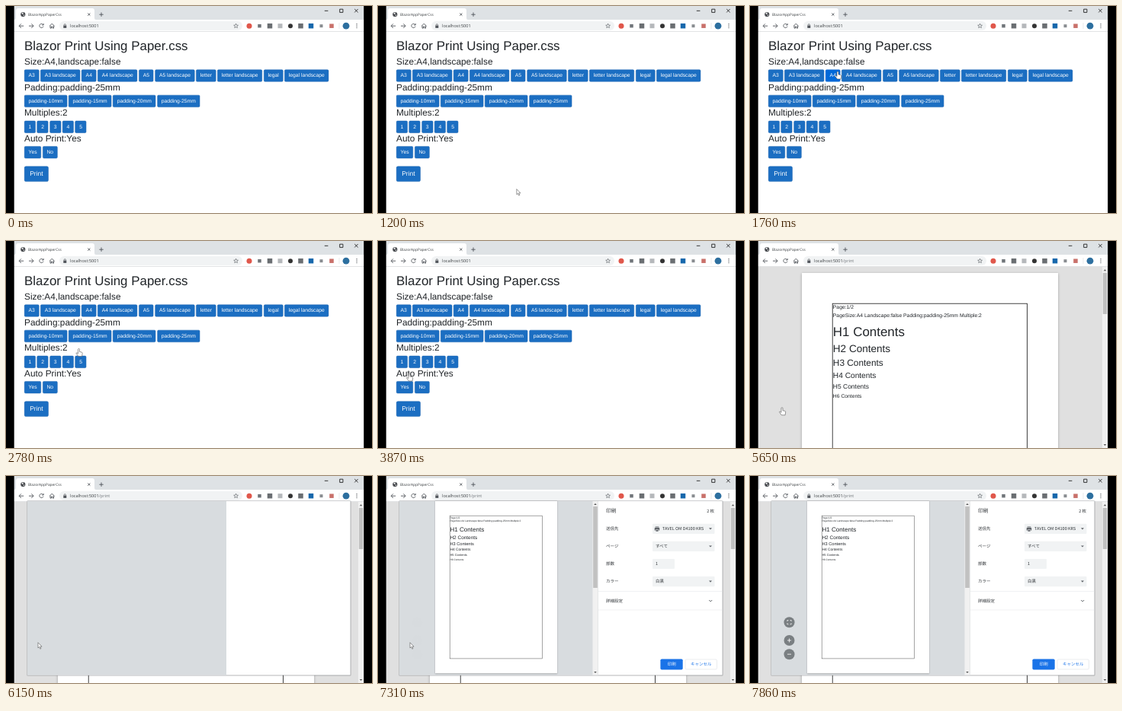
Recreate the animation shown at these times as an HTML page. Size 480x272 px, loop 8000 ms.

```html
<!DOCTYPE html>
<html lang="ja">
<head>
<meta charset="utf-8">
<title>Print demo</title>
<style>
html, body { margin: 0; width: 100%; height: 100%; overflow: hidden; background: #000; }
#stage { position: relative; width: 480px; height: 272px; overflow: hidden; background: #fff; text-rendering: geometricPrecision; }
#stage > * { position: absolute; }
svg { left: 0; top: 0; }
#form, .sheet { transform-origin: 0 0; font: 16px/1.5 "Liberation Sans", Arial, sans-serif; color: #212529; }
#form { left: 24px; top: 42px; width: 1040px; transform: scale(.4233); }
h1, h2, h3, h4, h5, h6 { margin: 0 0 8px; font-weight: 400; line-height: 1.2; }
h1 { font-size: 40px; } h2 { font-size: 32px; } h3 { font-size: 28px; }
h4 { font-size: 24px; } h5 { font-size: 20px; } h6 { font-size: 16px; }
p { margin: 0 0 16px; }
.row { height: 38px; white-space: nowrap; }
.btn { display: inline-block; vertical-align: top; padding: 6px 12px; border: 1px solid #1861ac; border-radius: 4px; background: #1b6ec2; color: #fff; }
.btn.lg { margin-top: 24px; padding: 8px 16px; font-size: 20px; border-radius: 5px; }
.btn.hover { background: #0069d9; border-color: #0062cc; }
.btn.down { background: #005cbf; }
#print { left: 0; top: 34px; width: 480px; height: 238px; background: #e0e0e0; }
.sheet { position: absolute; box-sizing: border-box; width: 210mm; height: 297mm; padding: 25mm; background: #fff; box-shadow: 0 .5mm 2mm rgba(0,0,0,.3); }
.frame { box-sizing: border-box; height: 100%; border: 2.4px solid #222; }
#print .sheet { left: 68px; top: 8.4px; transform: scale(.4233); }
#preview { left: 74.6px; top: 33px; transform: scale(.2015); }
.ui { font-family: "Open Sans", "Noto Sans", sans-serif; fill: #3c4043; }
.ja { font: 5.5px "Noto Sans CJK JP", "Noto Sans CJK", sans-serif; fill: #303438; }
.line { fill: none; stroke: #50545a; stroke-width: .9; }
</style>
</head>
<body>
<div id="stage">
  <div id="form"></div>
  <div id="print"><div class="sheet"></div></div>

  <svg width="480" height="272">
    <g id="scroll">
      <path fill="#f1f1f1" d="M462 34h7v238h-7z"/>
      <path fill="#c1c1c1" d="M462.8 42h5.4v54h-5.4z"/>
      <path fill="#555" d="M463.7 39.2l1.8-2 1.8 2zM463.7 267l1.8 2 1.8-2z"/>
    </g>
    <path fill="#dee2e5" d="M0 0h480v18H0z"/>
    <path fill="#fff" d="M0 18h480v15.5H0zM11 18q2 0 2-2V6q0-3 3-3h97q3 0 3 3v10q0 2 2 2z"/>
    <path fill="#d8dadd" d="M0 33.3h480v.6H0z"/>
    <rect x="70" y="20" width="240" height="12" rx="6" fill="#f1f3f4"/>
    <circle cx="22.3" cy="11" r="3.1" fill="#4a4d51"/>
    <path fill="#fff" d="M20.3 9.3l2-.9.6 1.3-1.3 1.2zM22.4 11.4l1.8.3-.9 1.5z"/>
    <g class="line">
      <path d="M107.2 9.5l3.2 3.2m0-3.2l-3.2 3.2M122.3 11.2h5.4m-2.7-2.7v5.4"/>
      <path stroke="#222" d="M417.8 6.3h4.6M437.7 4.2h4.2v4.2h-4.2zM457.2 4l4.4 4.4m0-4.4l-4.4 4.4"/>
      <path d="M23.2 26.2h-6m2.7-2.8l-2.8 2.8 2.8 2.8M30 26.2h6m-2.7-2.8l2.8 2.8-2.8 2.8"/>
      <path d="M48.6 24.5a2.6 2.6 0 1 0 .4 2.2M49.2 23v2h-2"/>
      <path d="M57 26.4l3.3-3.1 3.3 3.1M58 26v3.1h1.5v-2h1.6v2h1.5V26"/>
      <path stroke-width=".7" d="M76.2 26v-1.2a1.1 1.1 0 0 1 2.2 0V26"/>
      <path stroke-width=".6" d="M301.6 23.2l.8 1.9 2.1.2-1.6 1.4.5 2-1.8-1.1-1.8 1.1.5-2-1.6-1.4 2.1-.2z"/>
      <path stroke="#d0d3d7" stroke-width=".5" d="M437 22v8"/>
    </g>
    <path fill="#50545a" d="M75.3 25.7h4v3.2h-4z"/>
    <g id="badges"></g>
    <circle cx="446" cy="26.2" r="4.4" fill="#2d6f9f"/>
    <g fill="#50545a"><circle cx="460" cy="23.8" r=".7"/><circle cx="460" cy="26.2" r=".7"/><circle cx="460" cy="28.6" r=".7"/></g>
    <g class="ui">
      <text x="29" y="13" font-size="4.8">BlazorAppPaperCss</text>
      <text x="84" y="28.2" font-size="5.6">localhost:5001<tspan id="path" fill="#73777c">/print</tspan></text>
    </g>

    <g id="dialog">
      <rect x="27.2" y="32.2" width="425.4" height="230.6" rx="1.5" fill="#000" opacity=".16"/>
      <rect x="27.8" y="32.6" width="424" height="229.2" rx="1" fill="#fff" stroke="#a9adb1" stroke-width=".5"/>
      <path id="pane" fill="#d8dcdf" d="M28 33h261v228.6H28z"/>
      <text id="loading" class="ja" style="font-size:6px" x="158" y="149" text-anchor="middle">プレビューを読み込んでいます</text>
      <g id="options" class="ja">
        <text x="299" y="48" style="font-size:6.8px">印刷</text>
        <text x="441" y="47.6" text-anchor="end">2 枚</text>
        <g id="fields"></g>
        <path fill="#5f6368" d="M363.6 66.5h4.8v1.1h-4.8zM362.8 68h6.4v3.4h-1.2v-1.2h-4v1.2h-1.2zM364.5 70.8h3v1.9h-3z"/>
        <path fill="#e2e4e7" d="M289 151.4h162.5v.6H289zM289 175.7h162.5v.6H289z"/>
        <text x="299" y="165.8">詳細設定</text>
        <path class="line" d="M434.2 163l2 2 2-2"/>
        <rect x="370.4" y="240.5" width="29.3" height="14" rx="1.7" fill="#1a73e8"/>
        <rect x="403" y="241" width="41.5" height="13" rx="1.7" fill="#fff" stroke="#d5d9de" stroke-width=".5"/>
        <text x="385.2" y="249.3" text-anchor="middle" font-weight="500" fill="#fff">印刷</text>
        <text x="423.7" y="249.3" text-anchor="middle" fill="#1a73e8">キャンセル</text>
      </g>
      <g id="paneScroll">
        <path fill="#f1f1f1" d="M281.5 33h7v228.6h-7z"/>
        <path fill="#c1c1c1" d="M282.2 40h5.6v107h-5.6z"/>
        <path fill="#555" d="M283.2 38l1.8-2 1.8 2zM283.2 257l1.8 2 1.8-2z"/>
      </g>
    </g>
  </svg>

  <div id="preview" class="sheet"></div>

  <svg width="480" height="272">
    <g id="zoom">
      <g fill="#7a7f82"><circle cx="51.5" cy="192.2" r="7"/><circle cx="51.5" cy="216" r="7"/><circle cx="51.5" cy="234.2" r="7"/></g>
      <path fill="none" stroke="#fff" stroke-width=".8" d="M48.9 191v-1.4h1.5m2.2 0h1.5v1.4m0 2.4v1.4h-1.5m-2.2 0h-1.5v-1.4M49 216h5m-2.5-2.5v5M49 234.2h5"/>
    </g>
    <g id="cursor" fill="#fff" stroke="#555" stroke-width=".6" stroke-linejoin="round">
      <path id="hand" d="M-1 .9Q-1 0 0 0T1 .9V4l2.7.6q1.1.3 1 1.5L4.1 10H-.6L-3.4 6.2q-.3-1.2.9-.8L-1 6.5z"/>
      <path id="arrow" d="M0 0v7.2l1.6-1.5 1.2 2.7 1.2-.5-1.2-2.6h2.3z"/>
    </g>
    <path d="M0 0h10.7v272H0zM469.2 0H480v272h-10.8z"/>
  </svg>
</div>
<script>
const $ = id => document.getElementById(id);
const show = (id, on) => $(id).style.display = on ? '' : 'none';
const ramp = (t, a, b) => Math.min(1, Math.max(0, (t - a) / (b - a)));

const button = (label, extra = '') => `<span class="btn ${extra}">${label}</span>`;
const groups = [
  ['Size:A4,landscape:false', ['A3', 'A4', 'A5', 'letter', 'legal'].flatMap(s => [s, s + ' landscape'])],
  ['Padding:padding-25mm', [10, 15, 20, 25].map(n => `padding-${n}mm`)],
  ['Multiples:2', [1, 2, 3, 4, 5]],
  ['Auto Print:Yes', ['Yes', 'No']]
];
$('form').innerHTML = '<h1>Blazor Print Using Paper.css</h1>' + groups.map(([title, labels]) =>
  `<h3>${title}</h3><div class="row">${labels.map(l => button(l)).join(' ')}</div>`).join('') + button('Print', 'lg');

const headings = [1, 2, 3, 4, 5, 6].map(n => `<h${n}>H${n} Contents</h${n}>`).join('');
for (const sheet of document.querySelectorAll('.sheet'))
  sheet.innerHTML = `<div class="frame"><p>Page:1/2<br>PageSize:A4 Landscape:false Padding:padding-25mm Multiple:2</p>${headings}</div>`;

// Extension badges: x, colour, size, corner radius
$('badges').innerHTML = [
  [319, '#e0574b', 7, 3.5], [332.5, '#70757a', 4.5, 0], [346, '#6a6e72', 6.5, 0],
  [359.5, '#b5b8bb', 6, 0], [373, '#333', 6, 3], [386.5, '#6a6e72', 6.5, 0],
  [400, '#1768ac', 6.5, 0], [413.5, '#888c90', 4, 0], [427, '#c9706a', 5.5, 0]
].map(([x, c, s, r]) => `<rect x="${x - s / 2}" y="${26.2 - s / 2}" width="${s}" height="${s}" rx="${r}" fill="${c}"/>`).join('');

$('fields').innerHTML = [
  ['送信先', 'TAVEL OM D4100 KRS', 373], ['ページ', 'すべて', 364], ['部数', '1', 364], ['カラー', '白黒', 364]
].map(([label, value, x], i) => {
  const y = 69.3 + 23.1 * i, input = i == 2;
  return `<text x="299" y="${y + 1.7}">${label}</text>
    <rect x="360" y="${y - 6.6}" width="${input ? 29 : 81.5}" height="13.2" rx="1" fill="#f1f3f4"/>
    <text x="${x}" y="${y + 1.7}">${value}</text>` +
    (input ? '' : `<path fill="#5f6368" d="M434 ${y - 1}h4l-2 2.2z"/>`);
}).join('');

const buttons = [...document.querySelectorAll('.btn')];
const rects = buttons.map(b => b.getBoundingClientRect());
const origin = $('stage').getBoundingClientRect();

// Pointer route: time, x, y
const route = [
  [1100, 190, 258], [1600, 113, 93], [1760, 115, 86], [1940, 115, 86], [2280, 224, 121],
  [2420, 225, 122], [2670, 106, 139], [2780, 95.5, 141.5], [3050, 48, 157], [3270, 47, 156],
  [3460, 47, 156], [3650, 41, 174], [3870, 41, 174], [3920, 38, 189], [4150, 38, 189],
  [4700, 43, 215], [4930, 44, 212], [4970, 44, 212], [5190, 42, 218.8], [8000, 42, 218.8]
];
function pointer(t) {
  const i = Math.max(1, route.findIndex(k => k[0] > t));
  const [a, x0, y0] = route[i - 1], [b, x1, y1] = route[i];
  let k = ramp(t, a, b);
  k *= k * (3 - 2 * k);
  return [x0 + (x1 - x0) * k, y0 + (y1 - y0) * k];
}

function draw() {
  const t = performance.now() % 8000;
  const printing = t >= 5560, loaded = t >= 7310;
  const [x, y] = pointer(t), visible = t >= 1100 && t < 7860;

  show('form', !printing);
  show('print', printing);
  show('scroll', printing);
  show('path', printing);
  show('dialog', t >= 5840);
  show('pane', t >= 5960);
  show('loading', t >= 6590 && !loaded);
  $('options').style.opacity = ramp(t, 6560, 6840);
  show('paneScroll', loaded);
  show('preview', loaded);
  $('zoom').style.opacity = ramp(t, 7310, 7590);

  buttons.forEach((b, i) => {
    const r = rects[i], px = x + origin.left, py = y + origin.top;
    const over = visible && px > r.left && px < r.right && py > r.top && py < r.bottom;
    b.classList.toggle('hover', over);
    b.classList.toggle('down', over && t > 5000 && t < 5190);
  });

  const hand = t >= 1600 && t < 5840;
  show('cursor', visible);
  show('hand', hand);
  show('arrow', !hand);
  $('cursor').setAttribute('transform', `translate(${x} ${y})`);
  requestAnimationFrame(draw);
}
draw();
</script>
</body>
</html>
```
